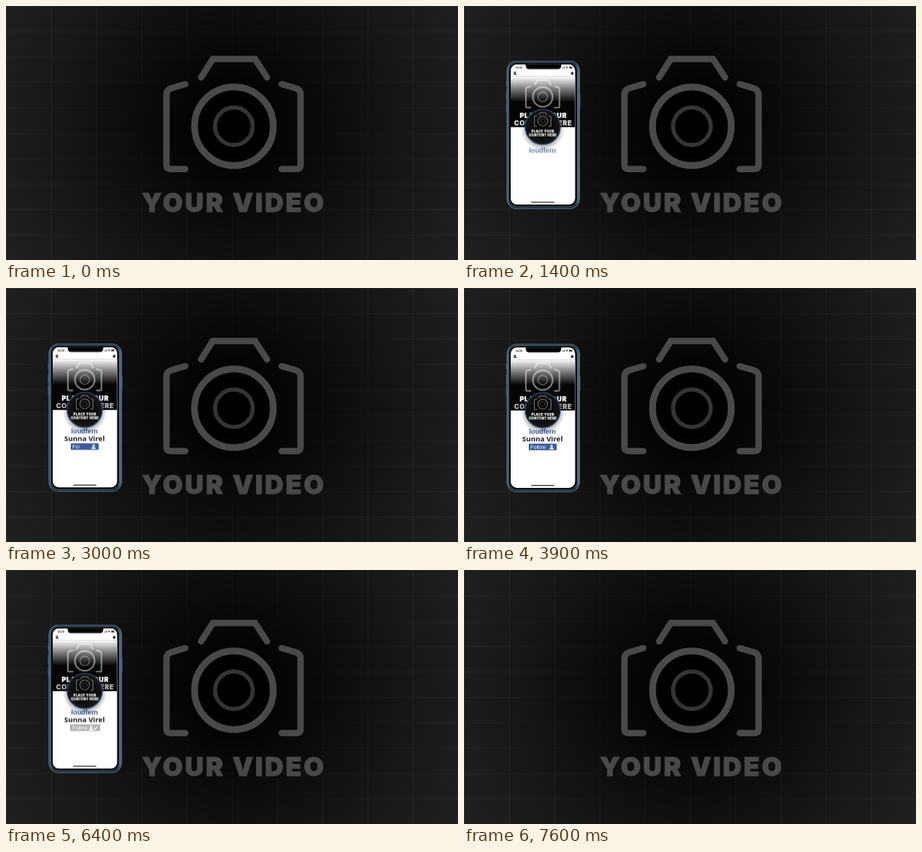
These frames come from a looping animation (600x338 px, 7900 ms). An HTML page without scripts:

```html
<!DOCTYPE html>
<html lang="en">
<head>
<meta charset="utf-8">
<title>Phone profile over video</title>
<style>
html, body { margin: 0; width: 100%; height: 100%; overflow: hidden; background: #000; }
svg { display: block; width: 100vw; height: 100vh; }
.heavy {
  font-family: Inter, "Liberation Sans", sans-serif; font-weight: 900;
  letter-spacing: .08em; text-anchor: middle;
  fill: currentColor; stroke: currentColor; stroke-width: .025em;
}
.sans { font-family: "Liberation Sans", sans-serif; }
.cam { fill: none; stroke: currentColor; stroke-width: 8.5; stroke-linecap: round; }

/* One 7.9 s loop drives every part; 1% = 79 ms */
.anim { animation: 7.9s linear infinite; }
.slide { animation-name: slide; }
.float { animation-name: float; }
.wipe { animation-name: wipe; }
.dim { animation-name: dim; }
.iris { animation-name: iris; }
.shade { animation-name: shade; }
.brand { animation-name: brand; }
.name { animation-name: name; }
.button { animation-name: button; transform-origin: 104.5px 210.3px; }
.plate { animation-name: plate; }
.type { animation-name: type; transform-origin: 87px 0; }
.badge { animation-name: badge; }
.check { animation-name: check; stroke-dasharray: 9; }

@keyframes slide {
  0%, 3.16% { transform: translateY(268px); animation-timing-function: cubic-bezier(.2, .4, .3, 1); }
  17.72%, 81.65% { transform: none; animation-timing-function: cubic-bezier(.7, 0, .8, .6); }
  96.1%, 100% { transform: translateY(268px); }
}
@keyframes float {
  0%, 19% { transform: translateY(-.5px); animation-timing-function: ease-in-out; }
  50% { transform: translateY(1.1px); animation-timing-function: ease-in-out; }
  81%, 100% { transform: translateY(-.5px); }
}
@keyframes wipe {
  0%, 6.33% { transform: translateY(78px); animation-timing-function: cubic-bezier(.3, .6, .4, 1); }
  19%, 100% { transform: none; }
}
@keyframes dim {
  0%, 13% { color: #fff; }
  22%, 100% { color: #b4b4b4; }
}
@keyframes iris {
  0%, 9.87% { r: 0; animation-timing-function: cubic-bezier(.1, .6, .4, 1); }
  17.72%, 100% { r: 25px; }
}
@keyframes shade {
  0%, 12.5% { opacity: 0; }
  18%, 100% { opacity: 1; }
}
@keyframes brand {
  0%, 15.2% { transform: translateY(-12px); opacity: 0; animation-timing-function: cubic-bezier(.2, .6, .3, 1); }
  22.8%, 28.5% { transform: translateY(7.7px); opacity: 1; animation-timing-function: ease-in-out; }
  35.4%, 100% { transform: none; opacity: 1; }
}
@keyframes name {
  0%, 29.1% { transform: translateY(8px); opacity: 0; animation-timing-function: ease-out; }
  35.4%, 100% { transform: none; opacity: 1; }
}
@keyframes button {
  0%, 32.3% { transform: scaleX(0); animation-timing-function: ease-out; }
  36.7%, 53.8% { transform: none; animation-timing-function: ease-in-out; }
  55.7% { transform: scale(.92); animation-timing-function: ease-in-out; }
  58.9%, 100% { transform: none; }
}
@keyframes plate {
  0%, 54.4% { fill: #3a5c9c; x: 86px; width: 37px; }
  57%, 100% { fill: #b1b1b3; x: 85px; width: 40px; }
}
@keyframes type {
  0%, 35% { transform: scaleX(0); }
  41.5%, 100% { transform: none; }
}
@keyframes badge {
  0%, 55.7% { transform: translate(116.3px, 210.5px); animation-timing-function: ease-in-out; }
  61.5%, 100% { transform: translate(113px, 210.5px); }
}
@keyframes check {
  0%, 60.8% { stroke-dashoffset: 9; opacity: 0; }
  61% { stroke-dashoffset: 9; opacity: 1; }
  65.5%, 100% { stroke-dashoffset: 0; opacity: 1; }
}
</style>
</head>
<body>
<svg viewBox="0 0 600 338" preserveAspectRatio="none">
  <defs>
    <radialGradient id="vignette" gradientUnits="userSpaceOnUse" cx="302" cy="160" r="345">
      <stop offset=".1" stop-color="#000"/>
      <stop offset=".35" stop-color="#000" stop-opacity=".66"/>
      <stop offset=".7" stop-color="#000" stop-opacity=".28"/>
      <stop offset="1" stop-color="#000" stop-opacity="0"/>
    </radialGradient>
    <pattern id="grid" width="60" height="33.8" patternUnits="userSpaceOnUse">
      <path d="M0 0H60M0 0V33.8" stroke="#fff" stroke-opacity=".07" stroke-width="1.6"/>
    </pattern>
    <linearGradient id="fade" x1="0" y1="0" x2="0" y2="1">
      <stop offset=".7" stop-color="#fff"/>
      <stop offset=".84" stop-color="#fff" stop-opacity=".5"/>
      <stop offset="1" stop-color="#fff" stop-opacity="0"/>
    </linearGradient>
    <linearGradient id="metal">
      <stop offset="0" stop-color="#47637e"/>
      <stop offset=".06" stop-color="#142130"/>
      <stop offset=".94" stop-color="#142130"/>
      <stop offset="1" stop-color="#5c7b98"/>
    </linearGradient>
    <radialGradient id="shadow">
      <stop offset=".72" stop-color="#000" stop-opacity=".35"/>
      <stop offset="1" stop-color="#000" stop-opacity="0"/>
    </radialGradient>
    <radialGradient id="disc">
      <stop offset=".3" stop-color="#030303"/>
      <stop offset="1" stop-color="#181818"/>
    </radialGradient>

    <g id="camera" class="cam">
      <path d="M259 95L274.5 70.5H330.5L346.5 95"/>
      <path id="side" d="M238 104L219 109.5Q213 111.500 213 118V212Q213 217 218 217H238"/>
      <use href="#side" transform="matrix(-1 0 0 1 604 0)"/>
      <circle cx="302.500" cy="160" r="52.3" stroke-width="9"/>
      <circle cx="302.500" cy="160" r="25" stroke-width="5.5" stroke-opacity=".72"/>
    </g>
    <g id="person">
      <circle cy="-1.500" r="1.600"/>
      <path d="M-3 3Q-3 .4 0 .4T3 3Z"/>
    </g>

    <clipPath id="screen"><rect x="62" y="78" width="85.500" height="187" rx="8.500"/></clipPath>
    <clipPath id="cover"><rect x="62" y="94" width="85.500" height="68"/></clipPath>
    <clipPath id="lens"><circle class="anim iris" cx="104.500" cy="161.500" r="25"/></clipPath>
    <clipPath id="typed"><rect class="anim type" x="87" y="204" width="23" height="13"/></clipPath>
  </defs>

  <rect width="600" height="338" fill="#202020"/>
  <rect width="600" height="338" fill="url(#grid)"/>
  <rect width="600" height="338" fill="url(#vignette)"/>
  <g color="#494949">
    <use href="#camera"/>
    <text class="heavy" x="302.500" y="273.500" font-size="34.500">YOUR VIDEO</text>
  </g>

  <g class="anim slide"><g class="anim float">
    <!-- body -->
    <path d="M56.300 100V107M56.300 114V126M56.300 130V142M153.900 117V136" stroke="#38536d" stroke-width="1.400"/>
    <rect x="57" y="73.700" width="96.400" height="196.400" rx="13" fill="url(#metal)" stroke="#48657f" stroke-width="1.200"/>
    <rect x="59.300" y="75.700" width="91.200" height="192" rx="11" fill="#040506" stroke="#7d98ae" stroke-width=".6"/>

    <g clip-path="url(#screen)">
      <rect x="62" y="78" width="86" height="187" fill="#fff"/>
      <g clip-path="url(#cover)">
        <rect x="62" y="94" width="86" height="68" fill="#050505"/>
        <g color="#777"><use href="#camera" transform="translate(28.900 81.500) scale(.25)"/></g>
        <g color="#fff" font-size="8.700">
          <text class="heavy" x="105.300" y="149.700">PLACE YOUR</text>
          <g class="anim dim"><text class="heavy" x="105" y="159.500">CONTENT HERE</text></g>
        </g>
        <rect class="anim wipe" x="62" y="14" width="86" height="114" fill="url(#fade)"/>
      </g>

      <text class="anim brand sans" x="104.300" y="193.300" font-size="8.900" font-weight="700" text-anchor="middle" fill="#3556a0">loudfern</text>
      <text class="anim name" x="104.200" y="202.600" font-family="Open Sans, sans-serif" font-size="9.500" font-weight="700" text-anchor="middle" fill="#1b1b1b">Sunna Virel</text>

      <g class="anim button" fill="#fff">
        <rect class="anim plate" x="86" y="206" width="37" height="8.700" rx=".8" fill="#3a5c9c"/>
        <text class="sans" x="88" y="212.800" font-size="7.200" clip-path="url(#typed)">Follow</text>
        <g class="anim badge"><use href="#person"/></g>
        <path class="anim check" d="M116.800 210.300L118.600 212.300L122 208" fill="none" stroke="#fff" stroke-width="1.100"/>
      </g>

      <circle class="anim shade" cx="104.500" cy="164" r="29" fill="url(#shadow)"/>
      <g clip-path="url(#lens)">
        <circle cx="104.500" cy="161.500" r="23.400" fill="url(#disc)" stroke="#2c4a78" stroke-width="1.200"/>
        <g color="#777"><use href="#camera" transform="translate(67 133.700) scale(.124)"/></g>
        <g color="#fff" font-size="4.200">
          <text class="heavy" x="104.700" y="168.600">PLACE YOUR</text>
          <text class="heavy" x="104.700" y="173.500">CONTENT HERE</text>
        </g>
      </g>

      <!-- status bar and app bar -->
      <path d="M80 77H131Q129 78 129 80Q129 84.500 124.500 84.500H86.500Q82 84.500 82 80Q82 78 80 77Z" fill="#040506"/>
      <text class="sans" x="68.500" y="83.700" font-size="3.500" font-weight="700" fill="#222">10:30</text>
      <g fill="#222">
        <path d="M130.500 83.500V82.500h.8v1zM131.700 83.500V82h.8v1.500zM132.900 83.500V81.200h.8v2.300z"/>
        <path d="M135 81.800q1.600-1.300 3.200 0L136.600 83.600z"/>
        <rect x="139.600" y="81.200" width="4.200" height="2.300" rx=".6"/>
        <use href="#person" transform="translate(67.800 90) scale(.7)"/>
        <path d="M65.200 89h1.600v.8h-1.600z"/>
        <path d="M141.800 91.700v-2l1.600-1.500h1.800v3.500z"/>
      </g>
      <rect x="89" y="261" width="31" height="1.300" rx=".65" fill="#222"/>
    </g>
  </g></g>
</svg>
</body>
</html>
```
